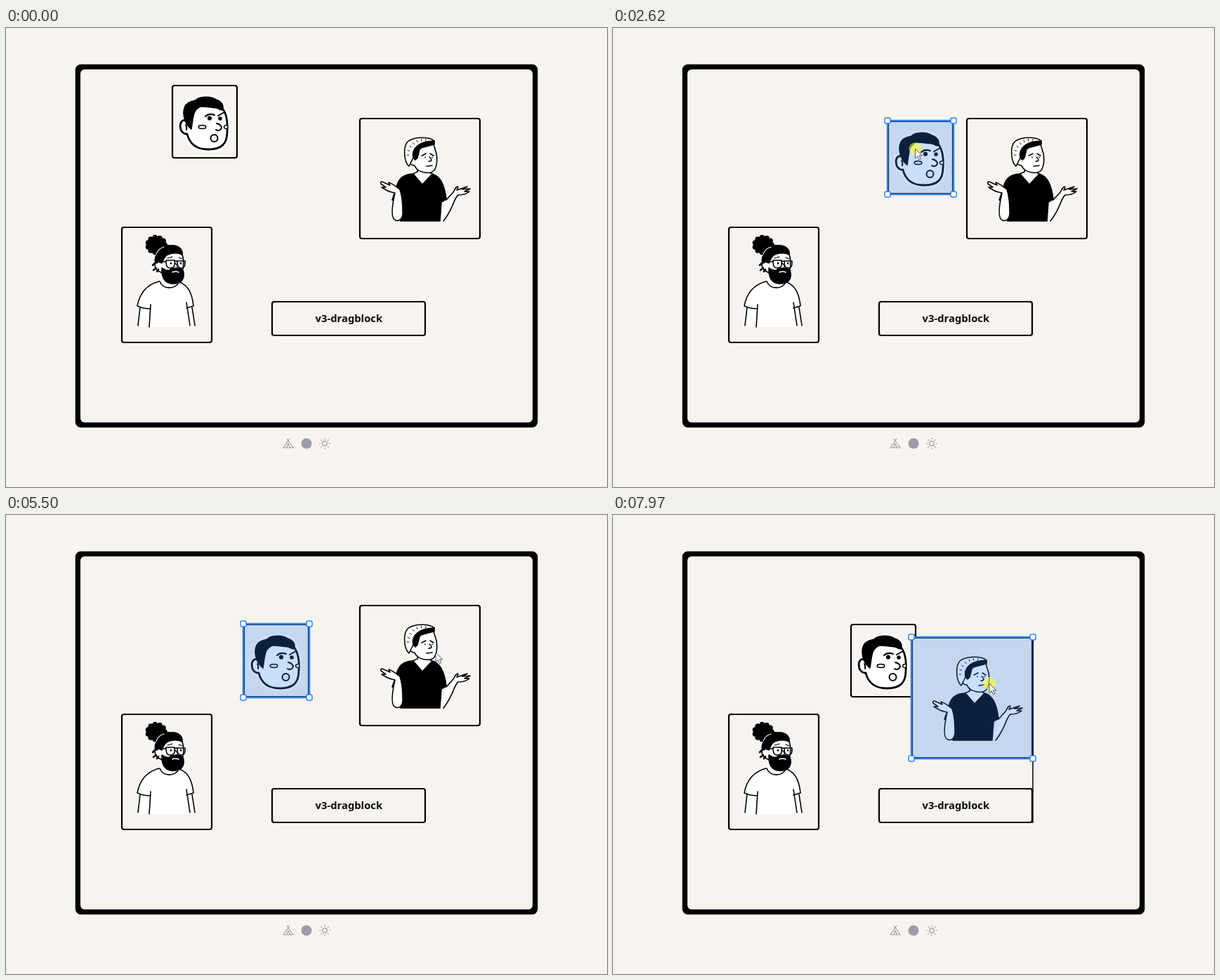
An HTML page that plays this animation: 856x654 px, repeating every 8 s.

```html
<!DOCTYPE html>
<html lang="en">
<head>
<meta charset="utf-8">
<title>v3-dragblock</title>
<style>
  html, body { margin: 0; width: 100%; height: 100%; overflow: hidden; background: #f7f4ef; }
  svg { display: block; width: 856px; height: 654px; }
  .card > rect { fill: #f7f4ef; stroke: #000; stroke-width: 2.2; }
  .art { fill: none; stroke: #000; stroke-width: 1.6; stroke-linecap: round; stroke-linejoin: round; }
  .white { fill: #fff; }
  .black { fill: #000; }
  .paper { fill: #f7f4ef; }
  .icons { fill: none; stroke: #9b9da6; stroke-width: 1.2; stroke-linejoin: round; }
  #selection rect { stroke: #2f80ed; }
  text { font: 700 14.8px "Noto Sans", "Open Sans", sans-serif; text-anchor: middle; fill: #0c0c0c; }
</style>
</head>
<body>
<svg viewBox="0 0 856 654">
  <rect x="98.700" y="51.700" width="658.600" height="517.600" rx="8"/>
  <rect class="paper" x="106" y="59" width="644" height="503" rx="6"/>

  <g class="icons">
    <path d="M404 585L395 598H409L400 585M402 592L399.500 598M402 592L404.500 598"/>
    <circle cx="428" cy="592" r="7.500" fill="#9b9da6" stroke="none"/>
    <circle cx="454" cy="592" r="3.300"/>
    <path id="rays"/>
  </g>

  <g class="card" id="beard">
    <rect x="165" y="284" width="128" height="164" rx="3"/>
    <g class="art">
      <path class="white" stroke="none" d="M218 361C199 366 190 380 187 397L191 399L188 426H269L264 399L267 397C265 377 259 366 247 362Z"/>
      <path d="M218 361C199 366 190 380 187 396C193 399 199 400 206 400M191 398L188 424M206 394L204 426M247 362C259 366 265 377 267 396L257 399M257 391L262 424M265 398L269 424"/>
      <path class="white" d="M219 361C223 373 242 373 246 362L242 356L222 346"/>
      <path class="white" d="M217 333C211 331 210 342 217 346L224 350L251 347C254 338 253 326 250 321L228 318Z"/>
      <path class="black" d="M214 324C217 313 225 308 234 310C244 309 252 314 251 323C243 319 235 321 230 323C225 326 224 331 222 335L217 333C212 339 211 330 214 324Z"/>
      <path class="black" d="M222 342C226 345 230 346 233 345C237 341 248 342 252 345C255 354 252 363 242 364C230 366 221 360 222 342Z"/>
      <path d="M212 335L209 338M214 342L210 345M217 344L215 347" stroke-width="2.500"/>
      <path d="M223 333H228M228 331H240C241 340 239 342 234 342C229 342 228 339 228 331ZM244 332H255C255 340 254 342 250 342C245 342 244 339 244 332ZM240 333Q242 331 244 333"/>
      <path d="M241 335C244 338 246 342 242 342M230 328L237 326M246 327L251 329" stroke-width="1.200"/>
      <path d="M237 348Q241 346 246 348" stroke="#fff"/>
      <path d="M235 335v.500M249 335v.500" stroke-width="2.500"/>
      <g id="bun"></g>
      <path d="M214 322Q217 314 225 312" stroke="#fff" stroke-width="1.200"/>
    </g>
  </g>

  <g class="card" id="button">
    <rect x="379" y="390" width="218" height="48" rx="3"/>
    <text x="488.300" y="419">v3-dragblock</text>
  </g>

  <g class="card" id="head">
    <rect x="237" y="82" width="92" height="103" rx="3"/>
    <g class="art">
      <path class="white" stroke="#fff" stroke-width="8" d="M257 132C245 127 245 152 258 151C262 167 273 173 288 173C307 173 315 165 315 148C316 135 315 123 309 115C309 100 290 95 272 102C259 104 250 112 257 132Z"/>
      <path class="white" stroke-width="2.800" d="M257 132C245 127 245 152 258 151C262 167 273 173 288 173C307 173 315 165 315 148C316 135 315 123 308 114L270 110Z"/>
      <path class="black" d="M255 132C253 126 252 120 254 114C256 107 262 105 270 103C276 97 292 97 299 102C307 104 311 111 308 117C303 116 299 114 295 110C288 113 281 110 275 113C268 117 267 124 266 130L264 144C260 141 257 137 255 132Z"/>
      <path stroke-width="2" d="M256 138Q258 141 257 145M284 126Q289 121 297 124M302 125L311 120M300 136C306 137 309 142 305 145Q302 147 299 145"/>
      <circle class="black" cx="290" cy="128.500" r="2.300"/>
      <circle class="black" cx="305" cy="129" r="2"/>
      <ellipse class="paper" cx="279.500" cy="141" rx="5.300" ry="2.500"/>
      <path class="paper" d="M315 138.500C309 138 309 144 315 143.500"/>
      <circle class="paper" cx="296.500" cy="157" r="5" stroke-width="2"/>
    </g>
  </g>

  <g class="card" id="beanie">
    <rect x="504" y="129" width="171" height="171" rx="3"/>
    <g class="art">
      <path class="white" d="M587 199L586 205L579 208L593 225L609 209L602 205Z"/>
      <path class="black" d="M580 208C565 208 558 215 555 231L550 245L563 249L562 275H618L620 248L627 244C625 226 620 211 607 208L593 223Z"/>
      <path class="white" d="M580 185C573 184 573 196 582 196C585 204 595 207 604 206C613 205 615 191 613 179L609 166L587 172Z"/>
      <path class="white" d="M574 197C567 191 565 170 572 162C582 154 604 155 610 161L609 166C593 166 584 172 580 185Z"/>
      <path class="black" d="M580 185C577 171 589 161 610 161L610 166C601 166 594 168 589 173L586 185L583 188Z"/>
      <path id="knit" stroke-width=".9"/>
      <path d="M592 182L598 179M604 179L609 182M603 184C608 188 606 190 602 190M599 197L607 196M597 184v.500M607 184v.500"/>
      <path class="white" d="M554 235C549 234 543 232 540 230L535 227L541 227L534 222C533 219 535 218 538 220L547 224L545 220C549 221 556 226 561 230C564 239 565 252 565 260C566 272 560 276 555 274C548 272 549 257 554 235Z"/>
      <path class="white" stroke="none" d="M627 245L637 235L645 238C638 247 635 260 623 275L619 274Z"/>
      <path class="white" d="M627 245L637 234C640 228 643 224 644 227L642 231L657 226L650 230L661 229L653 233L660 233C655 237 649 238 644 238C638 242 637 258 623 275"/>
    </g>
  </g>

  <g id="selection">
    <rect id="mask" fill="#2f80ed" fill-opacity=".25" stroke-width="2.500"/>
    <path id="guides" stroke="#000" stroke-width="1.500"/>
    <g id="handles"></g>
  </g>
  <g id="pointer">
    <circle id="press" r="9" fill="#ffff20" fill-opacity=".58"/>
    <path d="M0 0V13.500L3.200 10.700L5.500 15.500L7.800 14.500L5.500 9.800H9.700Z" fill="#fff" fill-opacity=".85" stroke="#333" stroke-width=".8"/>
  </g>
</svg>
<script>
const $ = id => document.getElementById(id);
const LOOP = 8000, STEP = 78, LEAD = 25, SNAP = 2.5;
const GRAB_HEAD = 1160, RELEASE = 5200, GRAB_BEANIE = 5650;

const cards = {
  head: { x: 236, y: 81, w: 94, h: 105, grab: [39.5, 40] },
  beanie: { x: 503, y: 128, w: 173, h: 173, grab: [109, 66] },
  beard: { x: 164, y: 283, w: 130, h: 166 },
  button: { x: 378, y: 389, w: 220, h: 50 }
};

// Each move: begin, end, x, y to reach. Positions rest between moves.
const paths = {
  pointer: [[140, 140, 759, 640], [215, 290, 445, 366], [540, 990, 276, 121],
    [5030, 5030, 377, 195], [RELEASE, 5500, 612, 196]],
  head: [[0, 0, 236, 81], [GRAB_HEAD, 1400, 294, 128], [1480, 1700, 255, 149], [1930, 2310, 374, 124],
    [2540, 2620, 391, 132], [3080, 3080, 379, 133], [3160, 3160, 391, 134],
    [3770, 3940, 391, 129], [4720, 5030, 338, 155]],
  beanie: [[0, 0, 503, 128], [GRAB_BEANIE, 6040, 512, 169], [6118, 6430, 558, 167],
    [6650, 6806, 485, 167], [6884, 7270, 427, 177], [7970, 7970, 427, 174]]
};
const moves = Object.values(paths).flat().sort((a, b) => a[0] - b[0]);

const ease = k => k * k * (3 - 2 * k);

function at(path, t) {
  let from = path[0].slice(2);
  for (const [begin, end, ...to] of path) {
    if (t < begin) break;
    if (t < end) {
      const k = ease((t - begin + STEP) / (end - begin + STEP));
      return from.map((value, i) => value + (to[i] - value) * k);
    }
    from = to;
  }
  return from;
}

// Time advances in even steps during a move and rests after it.
function stepTime(t) {
  const [begin, end] = moves.findLast(move => move[0] <= t);
  const count = Math.round((end - begin) / STEP);
  if (!count) return end;
  const gap = (end - begin) / count;
  return Math.min(end, begin + Math.floor((t - begin) / gap + 0.1) * gap);
}

// Aligns edges with the other cards and returns the guide lines.
function snap(box, others) {
  const hits = [];
  for (const [axis, size] of [["x", "w"], ["y", "h"]]) {
    for (const other of others) {
      for (const edge of [0, 1]) for (const otherEdge of [0, 1]) {
        const line = other[axis] + otherEdge * other[size];
        const start = line - edge * box[size];
        if (Math.abs(start - box[axis]) > SNAP) continue;
        box[axis] = start;
        hits.push([axis, line, other]);
      }
    }
  }
  return hits.map(([axis, line, o]) => axis === "x"
    ? `M${line} ${Math.min(box.y, o.y)}V${Math.max(box.y + box.h, o.y + o.h)}`
    : `M${Math.min(box.x, o.x)} ${line}H${Math.max(box.x + box.w, o.x + o.w)}`).join("");
}

function setBox(node, { x, y, w, h }) {
  for (const [name, value] of Object.entries({ x, y, width: w, height: h })) node.setAttribute(name, value);
}

const shift = (node, x, y) => node.setAttribute("transform", `translate(${x} ${y})`);
const show = (node, visible) => node.setAttribute("visibility", visible ? "visible" : "hidden");

function place(name, x, y) {
  const home = cards[name];
  shift($(name), x - home.x, y - home.y);
  return { ...home, x, y };
}

function render(t) {
  const now = stepTime(t);
  const active = now >= GRAB_BEANIE ? "beanie" : now >= GRAB_HEAD ? "head" : null;
  const pressed = active && (now < RELEASE || now >= GRAB_BEANIE);
  const boxes = { ...cards };
  for (const name of ["head", "beanie"]) boxes[name] = place(name, ...at(paths[name], now));

  show($("selection"), active);
  if (active) {
    const box = boxes[active];
    const guides = snap(box, Object.values(boxes).filter(other => other !== box));
    place(active, box.x, box.y);
    setBox($("mask"), box);
    $("guides").setAttribute("d", pressed ? guides : "");
    [...$("handles").children].forEach((handle, i) =>
      shift(handle, box.x + (i & 1) * box.w, box.y + (i >> 1) * box.h));
  }

  // A dragging pointer runs slightly ahead of its card.
  const tip = pressed
    ? at(paths[active], now + LEAD).map((value, i) => value + cards[active].grab[i])
    : at(paths.pointer, now);
  shift($("pointer"), ...tip);
  show($("pointer"), now >= 140);
  show($("press"), pressed);
}

// Short strokes pointing away from a centre
const spokes = (count, cx, cy, inner, outer, from, sweep) => Array.from({ length: count }, (_, i) => {
  const angle = from + sweep * i / count, c = Math.cos(angle), s = Math.sin(angle);
  return `M${cx + inner * c} ${cy + inner * s}L${cx + outer * c} ${cy + outer * s}`;
}).join("");

$("rays").setAttribute("d", spokes(8, 454, 592, 5.8, 8, 0, 2 * Math.PI));
$("knit").setAttribute("d", spokes(7, 594, 181, 20, 23, Math.PI, Math.PI * 0.65));
$("bun").innerHTML = '<circle class="black" cx="214" cy="309" r="11"/>' + Array.from({ length: 11 }, (_, i) =>
  `<circle class="black" r="3" cx="${214 + 12 * Math.cos(i * 0.571)}" cy="${309 + 10.5 * Math.sin(i * 0.571)}"/>`).join("");
$("handles").innerHTML =
  '<rect x="-4" y="-4" width="8" height="8" rx="2" fill="#fff" stroke-width="1.5"/>'.repeat(4);

const began = performance.now();
function frame() {
  render((performance.now() - began) % LOOP);
  requestAnimationFrame(frame);
}
frame();
</script>
</body>
</html>
```
